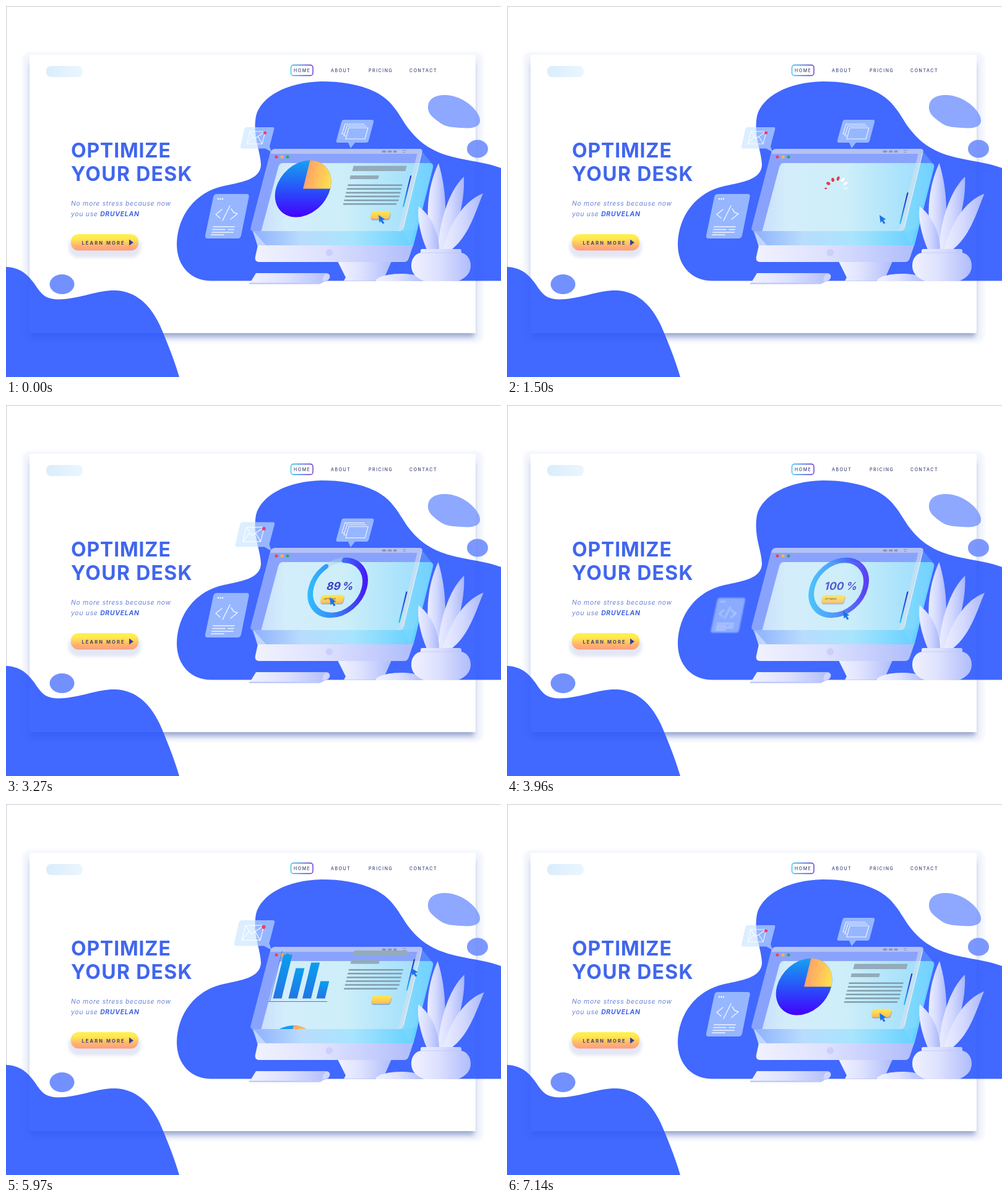
These frames come from a looping animation (800 px wide and 600 px high, 7170 ms). An HTML page:

```html
<!DOCTYPE html>
<html lang="en">
<head>
<meta charset="utf-8">
<title>Optimize your desk</title>
<style>
html, body { margin: 0; width: 100%; height: 100%; overflow: hidden; background: #fff; }
svg { display: block; width: 800px; height: 600px; font-family: Inter, sans-serif; }
.glass { fill: #c8e4ff; fill-opacity: .63; }
.line { fill: none; stroke: #fff; stroke-opacity: .85; stroke-linecap: round; stroke-linejoin: round; }
.nav { font-size: 7px; font-weight: 500; letter-spacing: 1.55px; fill: #3b4378; }
.blue { fill: #2d58ff; fill-opacity: .9; }
</style>
</head>
<body>
<svg viewBox="0 0 800 600">
<defs>
  <linearGradient id="gold" x2="0" y2="1"><stop stop-color="#fff34a"/><stop offset=".3" stop-color="#ffe652"/><stop offset=".7" stop-color="#ffb36e"/><stop offset="1" stop-color="#ff9c80"/></linearGradient>
  <linearGradient id="honey" x2="0" y2="1"><stop stop-color="#ffe94f"/><stop offset="1" stop-color="#ffbd5c"/></linearGradient>
  <linearGradient id="neon"><stop stop-color="#25bdf0"/><stop offset="1" stop-color="#5a1fd0"/></linearGradient>
  <linearGradient id="ringInk" gradientUnits="userSpaceOnUse" x1="492" x2="584" y1="310" y2="290"><stop stop-color="#2fbdfb"/><stop offset=".45" stop-color="#3a86f8"/><stop offset="1" stop-color="#4712f5"/></linearGradient>
  <linearGradient id="pieInk" x2="0" y2="1"><stop stop-color="#16a2f0"/><stop offset=".55" stop-color="#2a4cfa"/><stop offset="1" stop-color="#4300ff"/></linearGradient>
  <linearGradient id="slice"><stop stop-color="#ffa468"/><stop offset="1" stop-color="#ffe34c"/></linearGradient>
  <linearGradient id="barInk" x2="0" y2="1"><stop stop-color="#0a9df0"/><stop offset="1" stop-color="#2375e2"/></linearGradient>
  <linearGradient id="thumbInk" x2="0" y2="1"><stop stop-color="#2530b8"/><stop offset=".5" stop-color="#2a60e0"/><stop offset="1" stop-color="#22c8f5"/></linearGradient>
  <linearGradient id="screen"><stop stop-color="#b3d2fc"/><stop offset=".16" stop-color="#c8eefb"/><stop offset=".5" stop-color="#bdf0f7"/><stop offset=".8" stop-color="#7fdcfb"/><stop offset="1" stop-color="#66ccff"/></linearGradient>
  <linearGradient id="lower"><stop stop-color="#8db0fe"/><stop offset=".3" stop-color="#b9dcfd"/><stop offset=".6" stop-color="#a9e4fd"/><stop offset="1" stop-color="#62d0ff"/></linearGradient>
  <linearGradient id="clay"><stop stop-color="#f1f2fe"/><stop offset=".45" stop-color="#dde1fe"/><stop offset="1" stop-color="#b0bdfb"/></linearGradient>
  <linearGradient id="leafInk"><stop stop-color="#eceeff"/><stop offset=".5" stop-color="#d3d9fe"/><stop offset="1" stop-color="#a9b7fb"/></linearGradient>
  <linearGradient id="logo"><stop stop-color="#d9edfc"/><stop offset="1" stop-color="#ebf6fe"/></linearGradient>
  <filter id="soft" x="-20%" y="-20%" width="140%" height="140%"><feGaussianBlur stdDeviation="2.5"/></filter>
  <filter id="tight" x="-20%" y="-20%" width="140%" height="140%"><feGaussianBlur stdDeviation="4.5"/></filter>
  <path id="pane" d="M435 231H668q6 0 4.5 6L643 358q-1.5 6-7 6H400q-6 0-4.500-6L427 237q1.500-6 8-6Z"/>
  <clipPath id="paneClip"><use href="#pane"/></clipPath>
</defs>

<!-- page card -->
<rect x="27" y="75" width="744" height="469" rx="12" fill="#f2f5fd" filter="url(#soft)"/>
<rect x="40" y="92" width="717" height="443" fill="#5a70b0" fill-opacity=".6" filter="url(#tight)"/>
<rect x="38" y="79" width="721" height="450" fill="#fff"/>
<path d="M0 .5H800M.5 0V600" stroke="#c9cad2" fill="none"/>

<!-- flat blobs -->
<path class="blue" d="M800 262C775 253 757 252 735 247 690 238 668 222 648 195 635 176 625 153 597 139 570 126 540 122 510 122 455 123 412 146 404 178 398 212 412 235 412 258 410 281 380 285 352 291 305 301 277 340 276 385 276 422 300 444.500 332 444.500H800Z"/>
<path class="blue" d="M0 422C28 423 40 440 52 458 62 472 72 476 95 474 130 470 150 459 178 460 215 462 238 490 252 524 264 553 273 576 280 600H0Z"/>
<ellipse cx="90.500" cy="450" rx="20" ry="16" fill="#7291ff"/>
<path fill="#7f9cff" fill-opacity=".88" d="M682 166C681 150 694 143 712 144 740 146 764 168 766 184 767 195 755 199 735 197 722 196 712 196 703 190 692 182 683 176 682 166Z"/>
<ellipse cx="762" cy="231" rx="17" ry="14.500" fill="#6e8dff" fill-opacity=".9"/>

<!-- header and copy -->
<rect x="65" y="97" width="59" height="18" rx="8" fill="url(#logo)"/>
<rect x="460.500" y="95.500" width="35.500" height="17" rx="4" fill="none" stroke="url(#neon)" stroke-width="1.300"/>
<g class="nav">
  <text x="465" y="106.500">HOME</text><text x="525" y="106.500">ABOUT</text>
  <text x="586" y="106.500">PRICING</text><text x="652" y="106.500">CONTACT</text>
</g>
<g font-size="32" font-weight="700" fill="#4166ee">
  <text x="105" y="245" letter-spacing=".8">OPTIMIZE</text><text x="105" y="283" letter-spacing="1.300">YOUR DESK</text>
</g>
<g font-size="10.500" font-style="italic" letter-spacing=".65" fill="#6b82d6">
  <text x="105" y="322.500">No more stress because now</text>
  <text x="105" y="339.500">you use <tspan font-weight="700" fill="#4166e4">DRUVELAN</tspan></text>
</g>
<rect x="101" y="373" width="117" height="34" rx="16" fill="#dfe3f2" fill-opacity=".85" filter="url(#soft)"/>
<rect x="105" y="369" width="109" height="26.500" rx="12" fill="url(#gold)"/>
<text x="122.500" y="385.500" font-size="7.600" font-weight="700" letter-spacing="2.050" fill="#47406f">LEARN MORE</text>
<path d="M199 377.500 206 382.500 199 387.500Z" fill="#3a3f9e"/>

<!-- computer -->
<path d="M536 413H623L612 438 608 444.500H546L549 439Z" fill="url(#clay)"/>
<path d="M598 443C604 436 622 433 640 433 660 433 673 438 676 445H598Z" fill="url(#clay)"/>
<path d="M404 432H518q7 1 5 8-2 5-9 6l-7 4H393Z" fill="url(#clay)"/>
<path d="M393 447.500H509l-2 2.500H393Z" fill="#c4ccfa"/>
<path d="M511 445q1-11 7-12 6 0 5 6-2 6-12 6Z" fill="#d0d6fc"/>
<path d="M447 254H684q8 0 6 8L658 388H406L440 261q2-7 7-7Z" fill="url(#screen)"/>
<path d="M398 364H641L665 361 658 388H407Z" fill="url(#lower)"/>
<path d="M400 364 420 387H406Z" fill="#d3e3ff" fill-opacity=".7"/>
<path d="M407 387H658L651 408q-2 6-8 6H410q-9 0-7-9Z" fill="url(#clay)"/>
<circle cx="522.500" cy="399" r="5.800" fill="#cbcffa"/>
<path d="M673 236 690 257 653 387 641 364Z" fill="#8fdcff" fill-opacity=".28"/>
<use href="#pane" fill="#e1ebfb" fill-opacity=".45"/>
<path d="M428 236q2-5 8-5H668q6 0 4.500 6L643 358q-1.500 6-7 6h-6q4-1 5-5L664.500 239H427Z" fill="#e0e2ec" fill-opacity=".5"/>
<path d="M671.500 238 642 358" stroke="#fff" stroke-opacity=".55"/>
<g fill="#8d96b4"><rect x="607.500" y="233.500" width="7" height="3.500" rx="1.500"/><rect x="617" y="233.500" width="6.500" height="3.500" rx="1.500"/><rect x="626" y="233.500" width="5.500" height="3.500" rx="1"/><path d="M641 233h6l-1 1h-5Zm1 3h4l-1 1h-4Z"/></g>
<circle cx="437" cy="244" r="2.600" fill="#e8455c"/><circle cx="446" cy="244" r="2.600" fill="#f3b640"/><circle cx="455" cy="244" r="2.600" fill="#36a564"/>

<!-- window content, drawn upright then slanted -->
<g clip-path="url(#paneClip)"><g transform="matrix(1 0 -.245 1 72.500 0)">
  <g id="pages">
    <g id="bars"></g>
    <g transform="translate(0 128)">
      <ellipse cx="480" cy="295.500" rx="44" ry="46" fill="url(#pieInk)"/>
      <path d="M480 295.500V249.500A44 46 0 0 1 524 295.500Z" fill="url(#slice)"/>
      <g id="copy2" transform="translate(4 2)"></g>
    </g>
  </g>
  <rect id="thumb" x="648" width="2.200" height="51" rx="1" fill="url(#thumbInk)"/>
  <g id="spinner"></g>
  <g id="meter">
    <ellipse cx="536" cy="295.500" rx="43" ry="44.500" fill="none" stroke="#a9d3e2" stroke-opacity=".45" stroke-width="8"/>
    <path id="arc" d="M536 251A43 44.500 0 0 1 536 340 43 44.500 0 0 1 536 251" pathLength="100" fill="none" stroke="url(#ringInk)" stroke-width="8.500" stroke-linecap="round"/>
    <text id="percent" x="539.500" y="299.500" text-anchor="middle" font-size="17.500" font-weight="700" fill="#3f3fc4"></text>
    <rect x="514" y="308.500" width="37" height="14" rx="4.500" fill="#6a83b0" fill-opacity=".55"/>
    <rect x="513" y="307" width="37" height="13.500" rx="4.500" fill="url(#honey)"/>
    <text x="518" y="315.500" font-size="4" font-weight="600" fill="#6f6048">OPTIMIZE</text>
  </g>
</g></g>

<!-- floating notes -->
<g id="mail">
  <path class="glass" d="M389 196H431q3 0 2.300 3L426 227 429 236 419 230.500H382q-4 0-3-4L385 200q1-4 4-4Z"/>
  <path class="line" stroke-width="1.100" d="M394 203H419L414 223H389ZM394 203 402 214.500 419 203M389 223 399 211M414 223 407 211"/>
  <circle cx="418.500" cy="205" r="2.600" fill="#ec4060"/>
</g>
<g id="gallery">
  <path class="glass" d="M546 184H591q4 0 3 4L586 218q-1 3-4 3H564L557 230 553 221H536q-3 0-2-4L542 188q1-4 4-4Z"/>
  <path class="line" stroke-width="1.100" d="M554 197H585L580 215H549ZM549 210H546L551 194H582M546 207H543L548 191H579"/>
</g>
<g id="code">
  <path class="glass" d="M341 304H389q4.500 0 3.500 5L380 371q-1 5-6 5H326q-5 0-4-5L335 309q1-5 6-5Z"/>
  <path class="line" stroke-width="1.500" d="M349 329 339 337 346 343M364 328 368 334 374 336 363 345M362 323 350 347"/>
  <path class="line" stroke-width="1.700" d="M335 357H369M334 361.500H354M359 361.500H368M333 366H367M332 370H352"/>
  <g fill="#fff"><circle cx="343" cy="312" r="1.200"/><circle cx="346.500" cy="312" r="1.200"/><circle cx="350" cy="312" r="1.200"/></g>
</g>

<!-- plant -->
<g fill="url(#leafInk)">
  <path class="leaf" d="M690 394C676 345 680 295 699 254 713 300 713 350 704 394Z"/>
  <path class="leaf" d="M698 394C700 350 715 300 740 276 742 320 727 365 712 394Z"/>
  <path class="leaf" d="M706 394C718 350 740 315 771 303 758 335 748 372 720 394Z"/>
  <path class="leaf" d="M680 394C670 370 664 345 667 324 688 340 700 368 700 394Z"/>
</g>
<path fill="url(#clay)" d="M676 445C662 440 655 431 655 420 655 409 661 401 670 399V396q0-3 3-3H733q3 0 3 3V399C745 401 751 409 751 420 751 431 744 440 730 445Z"/>
<path d="M670 399H736" stroke="#b5bef6" stroke-opacity=".6"/>

<path id="cursor" d="M0 0 10.500 7 6.300 8.300 9.500 13 6.800 14.500 4 10 1.600 12.500Z" fill="#1c72ea"/>
</svg>
<script>
const LOOP = 7170;
const $ = id => document.getElementById(id);
const add = (parent, tag, attrs) => {
  const el = document.createElementNS('http://www.w3.org/2000/svg', tag);
  for (const k in attrs) el.setAttribute(k, attrs[k]);
  return parent.appendChild(el);
};
const box = (parent, x, y, width, height, fill, rx = 0) => add(parent, 'rect', {x, y, width, height, fill, rx});
const ramp = (t, a, b) => Math.min(1, Math.max(0, (t - a) / (b - a)));
const smooth = (t, a, b) => {
  const u = ramp(t, a, b);
  return u < .5 ? 2 * u * u : 1 - 2 * (1 - u) ** 2;
};
const overshoot = u => 1 + 3.6 * (u - 1) ** 3 + 2.6 * (u - 1) ** 2;
const show = (el, opacity) => el.setAttribute('opacity', opacity);

function addCopy(parent) {
  const ink = '#93abba';
  box(parent, 548.5, 256.5, 86, 8.5, ink);
  box(parent, 547.5, 272, 46, 6, ink);
  for (let i = 0; i < 6; i++) box(parent, 547, 286.5 + i * 6.1, i == 5 ? 86 : 88, 2.5, '#829dae');
  box(parent, 597, 331.5, 31, 13, '#718bb0', 4).setAttribute('fill-opacity', .6);
  box(parent, 596, 329.5, 31, 13, 'url(#honey)', 4);
}

const bars = $('bars');
[[436, 263], [461, 285], [483.5, 276], [506, 306]].forEach(([x, y]) => box(bars, x, y, 14, 334 - y, 'url(#barInk)'));
add(bars, 'path', {d: 'M432 257V339M430 339H525', stroke: '#5577cc', fill: 'none', 'stroke-width': .9});
addCopy(bars);
addCopy($('copy2'));

const dots = Array.from({length: 12}, (_, i) => add($('spinner'), 'ellipse', {
  rx: 3.6, ry: 2.2, transform: `translate(531 295) rotate(${180 + 30 * i}) translate(16 0)`
}));
const leaves = [...document.querySelectorAll('.leaf')];
const leafSwing = [-.7, .4, 1.6, -.4];

// [start, end, x, y]: the cursor reaches each point at its end time
const path = [[0, 1, 602, 338], [1900, 2250, 523, 311], [3550, 3900, 543, 333],
  [4900, 5520, 656, 261], [5750, 6550, 649.5, 288], [6600, 7000, 602, 338]];

function scaleAt(el, s, x, y) {
  el.setAttribute('transform', `translate(${x} ${y}) scale(${Math.max(0, s)}) translate(${-x} ${-y})`);
}

function popNote(el, t, out, back, x, y) {
  const u = t < 5000 ? 1 - ramp(t, out, out + 350) : ramp(t, back, back + 350);
  scaleAt(el, overshoot(u), x, y);
  show(el, Math.min(1, u * 4));
}

function drawCode(t) {
  const leave = ramp(t, 3650, 4250);
  const enter = 1 - (1 - ramp(t, 6380, 6900)) ** 3;
  const back = t > 5000;
  scaleAt($('code'), back ? enter : 1 - .4 * smooth(leave, 0, 1), 357, 340);
  show($('code'), back ? enter : 1 - leave ** 3);
  const blur = 3 * (back ? 1 - enter : leave);
  $('code').style.filter = blur > .02 ? `blur(${blur}px)` : 'none';
}

function drawSpinner(t) {
  const head = (t - 1050) / 75;
  dots.forEach((dot, i) => {
    const age = ((head - i) % 12 + 12) % 12;
    const live = age < 6.6 && head >= i;
    show(dot, live ? Math.min(1, .35 + age * .5) : 0);
    dot.setAttribute('fill', age < 2.5 ? '#fff' : '#e23c4c');
    dot.setAttribute('rx', age > 5.5 ? 2 : 3.6);
    dot.setAttribute('ry', age > 5.5 ? 1.2 : 2.2);
  });
  show($('spinner'), ramp(t, 1050, 1150) * (1 - ramp(t, 1850, 1980)));
}

function drawMeter(t) {
  const p = Math.round(100 * smooth(t, 2200, 3600));
  show($('meter'), ramp(t, 1920, 2150) * (1 - ramp(t, 3850, 4500)));
  show($('arc'), p > 0 ? 1 : 0);
  $('arc').setAttribute('stroke-dasharray', p < 100 ? `${p} 200` : 'none');
  $('percent').textContent = p + (p < 100 ? '\u2009%' : ' %');
}

function drawCursor(t) {
  let [, , x, y] = path[0];
  for (const [a, b, px, py] of path.slice(1)) {
    const u = smooth(t, a, b);
    x += (px - x) * u;
    y += (py - y) * u;
  }
  const click = at => Math.max(0, 1 - Math.abs(t - at) / 120);
  const s = 1 - .15 * (click(400) + click(2330));
  $('cursor').setAttribute('transform', `translate(${x} ${y}) scale(${s})`);
}

function draw(t) {
  const down = 1 + smooth(t, 600, 1150) + smooth(t, 5750, 6550);
  const scroll = down - (t > 4550 ? 2 : 0);
  $('pages').setAttribute('transform', `translate(0 ${-128 * scroll})`);
  show($('pages'), t < 2000 ? 1 : ramp(t, 4700, 5560));
  $('thumb').setAttribute('y', 246.5 + 27.5 * (down - 2 * smooth(t, 4200, 4700)));
  drawSpinner(t);
  drawMeter(t);
  popNote($('mail'), t, 3150, 5790, 429, 236);
  popNote($('gallery'), t, 3250, 6560, 557, 230);
  drawCode(t);
  const sway = .5 - .5 * Math.cos(8 * Math.PI * t / LOOP);
  leaves.forEach((leaf, i) => leaf.setAttribute('transform', `rotate(${leafSwing[i] * sway} 705 394)`));
  drawCursor(t);
}

function frame() {
  draw(performance.now() % LOOP);
  requestAnimationFrame(frame);
}
frame();
</script>
</body>
</html>
```
